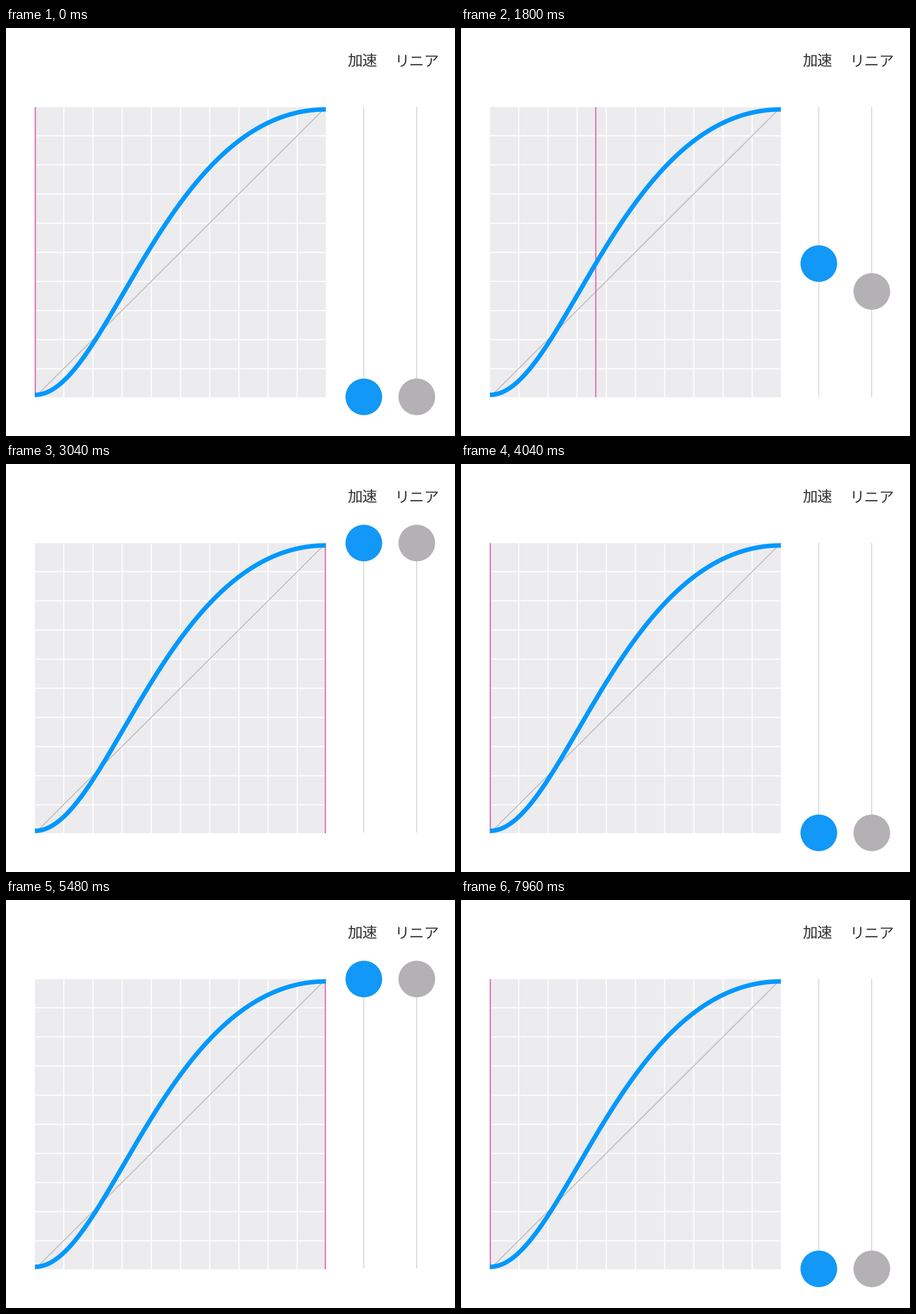
A matplotlib script for the animation above (8000 ms loop, 784 by 714 pixels).

```python
import matplotlib
import matplotlib.pyplot as plt
import numpy as np
from matplotlib.animation import FuncAnimation
from matplotlib.patches import Circle, Rectangle

matplotlib.rcParams["text.hinting"] = "none"
matplotlib.rcParams["text.hinting_factor"] = 1

W, H, DPI = 784, 714, 100
STEP, LOOP = 40, 8000
PX = 72 / DPI

# plot area and slider travel
LEFT, RIGHT, TOP, BOTTOM = 50.5, 558.5, 138.5, 646.2
LOW, HIGH = 645.5, 138.3
BLUE, GREY, PINK = "#1298f6", "#b3b1b4", "#dc56aa"

# timing of the up and down sweeps, in ms
FIRST, PERIOD, SWEEP, BACK = 1672.7, 3296.3, 350, 1570


def bezier(t, x1=0.25, y1=0.0, x2=0.45, y2=1.0):
    a, b, c = 3 * (1 - t) ** 2 * t, 3 * (1 - t) * t ** 2, t ** 3
    return a * x1 + b * x2 + c, a * y1 + b * y2 + c


CURVE_X, CURVE_Y = bezier(np.linspace(0, 1, 301))


def ease(p):
    return float(np.interp(p, CURVE_X, CURVE_Y))


def lerp(a, b, p):
    return a + (b - a) * p


def progress(ms):
    if ms < FIRST:
        return 0.0
    phase = (ms - FIRST) % PERIOD
    up = np.clip(phase / SWEEP, 0, 1)
    down = np.clip((phase - BACK) / SWEEP, 0, 1)
    return float(up - down)


fig = plt.figure(figsize=(W / DPI, H / DPI), dpi=DPI, facecolor="white")
ax = fig.add_axes([0, 0, 1, 1])
ax.set_xlim(0, W)
ax.set_ylim(H, 0)
ax.axis("off")


def stroke(xs, ys, color, width, z):
    line, = ax.plot(xs, ys, color=color, lw=width * PX, zorder=z,
                    solid_capstyle="butt", snap=False)
    return line


def ball(x, color):
    dot = Circle((x, LOW), 32, fc=color, ec="none", zorder=7)
    ax.add_patch(dot)
    return dot


def label(x, text):
    ax.text(x, 66.6, text, family="Noto Sans CJK JP", fontsize=26 * PX,
            color="#3c3c3c", ha="left", va="baseline")


panel = Rectangle((LEFT, TOP), RIGHT - LEFT, BOTTOM - TOP, fc="#ecebee",
                  ec="none", zorder=1, snap=False)
ax.add_patch(panel)
for k in range(1, 10):
    x, y = 49.9 + 50.95 * k, 137.5 + 51 * k
    stroke([x, x], [TOP, BOTTOM], "white", 2, 2)
    stroke([LEFT, RIGHT], [y, y], "white", 2, 2)

stroke([LEFT, RIGHT], [BOTTOM, TOP], "#bdbdbf", 1.7, 3)
marker = stroke([51.2, 51.2], [TOP, BOTTOM], PINK, 1.8, 4)
stroke(lerp(LEFT, RIGHT, CURVE_X), lerp(642, 142.5, CURVE_Y), "#0098fd", 7.8, 5)

for x in (624.6, 717.1):
    stroke([x, x], [138, 645], "#d9d9d9", 1.9, 6)
eased = ball(624.8, BLUE)
linear = ball(717.3, GREY)
label(596.3, "加速")
label(678.8, "リニア")


def draw(i):
    p = progress(i * STEP)
    x = lerp(51.2, 557.6, p)
    marker.set_xdata([x, x])
    eased.center = (624.8, lerp(LOW, HIGH, ease(p)))
    linear.center = (717.3, lerp(LOW, HIGH, p))
    return marker, eased, linear


anim = FuncAnimation(fig, draw, frames=LOOP // STEP, interval=STEP,
                     repeat=True, repeat_delay=0, blit=False)
plt.show()
```
